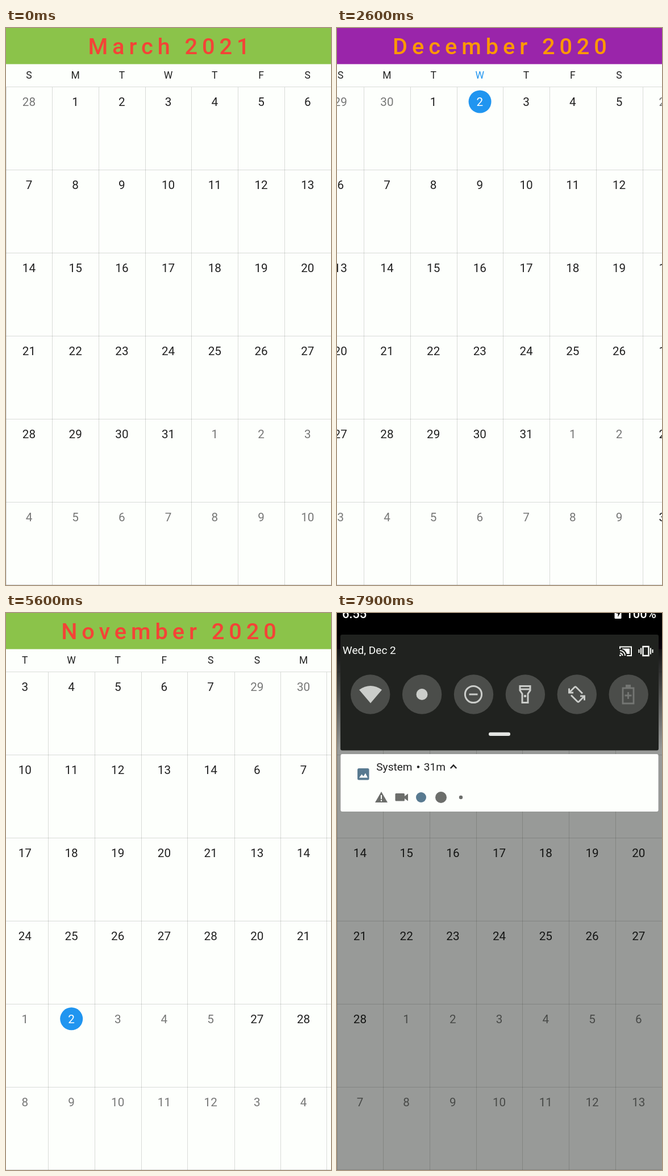
Write an HTML page with a canvas that moves like this. It is 572 px wide and 979 px high and loops after 8000 ms.

```html
<!DOCTYPE html>
<html lang="en">
<head>
<meta charset="utf-8">
<title>Month calendar</title>
<style>
html, body { margin: 0; width: 100%; height: 100%; overflow: hidden; background: #fdfffc; }
canvas { display: block; }
</style>
</head>
<body>
<canvas id="stage" width="572" height="979"></canvas>
<script>
const ctx = document.getElementById('stage').getContext('2d');
const W = 572, H = 979, LOOP = 8000, STEP = 100;
const COL = W / 7, TOP = 103.3, ROW = 145.95;
const PAPER = '#fdfffc', BLUE = '#2095f0', INK = '#212121', MUTED = '#767776';
const MONTHS = ['January', 'February', 'March', 'April', 'May', 'June', 'July',
  'August', 'September', 'October', 'November', 'December'];
const YEAR = 2020, TODAY = new Date(YEAR, 11, 2).getTime();
const FIRST_MONTH = 14; // months counted from January 2020
const SETTLE = 250;

const SWIPES = [
  { start: 560, release: 860, drag: 250, step: -1 },
  { start: 1500, release: 1770, drag: 250, step: -1 },
  { start: 2320, release: 2441, drag: 200, step: -1 },
  { start: 3060, release: 3350, drag: 250, step: -1 },
  { start: 3904, release: 4150, drag: 250, step: -1 },
  { start: 4840, release: 5050, drag: 250, step: 1 },
  { start: 5505, release: 5620, drag: 250, step: 1 },
  { start: 6130, release: 6301, drag: 250, step: 1 },
  { start: 6930, release: 7050, drag: 250, step: 1 }
];

// cubic-bezier(.25, .1, .25, 1)
function ease(x) {
  let lo = 0, hi = 1;
  for (let i = 0; i < 24; i++) {
    const s = (lo + hi) / 2;
    if (.75 * s * (1 - s) + s ** 3 < x) lo = s; else hi = s;
  }
  return .3 * lo * (1 - lo) ** 2 + 3 * lo * lo * (1 - lo) + lo ** 3;
}

function smooth(from, to, t) {
  const u = Math.min(1, Math.max(0, (t - from) / (to - from)));
  return u * u * (3 - 2 * u);
}

function text(str, x, y, size, color, align = 'center', weight = 400) {
  ctx.font = `${weight} ${size}px Roboto, sans-serif`;
  ctx.textAlign = align;
  ctx.fillStyle = color;
  ctx.fillText(str, x, y);
}

function rect(x, y, w, h, color) {
  ctx.fillStyle = color;
  ctx.fillRect(x, y, w, h);
}

function box(x, y, w, h, r, color) {
  ctx.beginPath();
  ctx.roundRect(x, y, w, h, r);
  ctx.fillStyle = color;
  ctx.fill();
}

function disc(x, y, r, color) {
  ctx.beginPath();
  ctx.arc(x, y, r, 0, Math.PI * 2);
  ctx.fillStyle = color;
  ctx.fill();
}

function shape(d, color, width) {
  const path = new Path2D(d);
  if (width) {
    ctx.strokeStyle = color;
    ctx.lineWidth = width;
    ctx.stroke(path);
  } else {
    ctx.fillStyle = color;
    ctx.fill(path);
  }
}

function drawHeader(month) {
  const date = new Date(YEAR, month, 1);
  const green = date.getMonth() % 2 === 0;
  const spacing = 7.94;
  const title = `${MONTHS[date.getMonth()]} ${date.getFullYear()}`;
  rect(0, 0, W, 63.5, green ? '#8bc34a' : '#9a25aa');
  ctx.letterSpacing = spacing + 'px';
  ctx.font = '500 39.7px Roboto, sans-serif';
  const left = (W - ctx.measureText(title).width + spacing) / 2 + .5;
  text(title, left, 45.6, 39.7, green ? '#f44336' : '#ff9800', 'left', 500);
  ctx.letterSpacing = '0px';
}

function drawMonth(month, shift) {
  const first = new Date(YEAR, month, 1);
  const hasToday = new Date(TODAY).getMonth() === first.getMonth()
    && first.getFullYear() === YEAR;
  for (let c = 0; c < 7; c++) {
    const x = shift + (c + .5) * COL - .4;
    const edge = shift + Math.max(.4, c * COL - .4);
    rect(Math.round(edge), 104, 1, H - 104, 'rgba(0,0,0,.14)');
    const isWeekday = hasToday && c === new Date(TODAY).getDay();
    text('SMTWTFS'[c], x, 89.2, 17.5, isWeekday ? BLUE : INK);
    for (let r = 0; r < 6; r++) {
      const day = new Date(YEAR, month, 1 - first.getDay() + r * 7 + c);
      const y = 129.5 + r * ROW;
      const isToday = day.getTime() === TODAY;
      if (isToday) disc(x + .2, y, 20, BLUE);
      const color = isToday ? '#fff' : day.getMonth() === first.getMonth() ? INK : MUTED;
      text(day.getDate(), x, y + 7.4, 20.66, color);
    }
  }
}

function drawCalendar(t) {
  let month = FIRST_MONTH, title = month, shift = 0, step = 0;
  for (const s of SWIPES) {
    if (t >= s.release + SETTLE) {
      month += s.step;
      title = month;
    } else if (t > s.start) {
      const released = t >= s.release;
      const travel = released
        ? s.drag + (W - s.drag) * ease((t - s.release) / SETTLE)
        : s.drag * ((t - s.start) / (s.release - s.start)) ** 2;
      step = s.step;
      shift = -step * travel;
      if (released) title = month + step;
      break;
    }
  }
  drawMonth(month, shift);
  if (step) drawMonth(month + step, shift + step * W);
  for (let r = 0; r <= 6; r++) {
    rect(0, Math.min(978, Math.round(TOP + r * ROW)), W, 1, 'rgba(0,0,0,.14)');
  }
  drawHeader(title);
}

function drawTiles() {
  const light = '#cbcdca', dim = '#747673', face = '#4b4d4a';
  for (let i = 0; i < 6; i++) disc(58.7 + i * 90.9, 143, 34.7, face);
  shape('M59 158.5 L39 135 Q59 121 79 135 Z', light);
  disc(149.5, 143, 10, light);
  shape('M254.6 143 A14.6 14.6 0 1 1 225.4 143 A14.6 14.6 0 1 1 254.6 143 M232.5 143 H247.5', light, 3);
  shape('M322 128.5 H340 V136 L336 142 V157.5 H326 V142 L322 136 Z M322 134 H340', light, 3);
  disc(331, 146, 2.3, light);
  shape('M408.5 132.5 V140 H416 M409 139.5 L418 130.5 Q419.5 129 421 130.5 L432 141.5', light, 2.9);
  shape('M435.5 153.5 V146 H428 M435 146.5 L426 155.5 Q424.5 157 423 155.5 L412 144.5', light, 2.9);
  shape('M503 132 H522 V159 H503 Z M506.5 145 H518.5 M512.5 139 V151', dim, 2.8);
  rect(508, 126, 9, 5, dim);
}

function drawStatus() {
  const white = '#fdfffc';
  text('6:55', 9, 9, 22, white, 'left', 500);
  text('100%', 562, 9, 22, white, 'right', 500);
  box(488.5, -10, 12, 20, 1.5, white);
  shape('M496 -7 L491.5 1 H494.5 V7 L499 -1 H496 Z', '#000');
  text('Wed, Dec 2', 9.8, 71.7, 19.07, white, 'left');
  shape('M498 63 V59.5 H518 V75 H510 M498 66 A9 9 0 0 1 507 75 M498 70.5 A5 5 0 0 1 502.5 75', white, 2);
  shape('M502 62.5 H515 V72 H510 Q508 65 502 63.5 Z', white);
  disc(498.5, 74.5, 1.6, white);
  shape('M538.5 59 H548.5 V75 H538.5 Z', white, 2.4);
  shape('M535 61.5 V72.5 M531.5 64 V70 M552 61.5 V72.5 M555.5 64 V70', white, 2);
}

function drawNotice() {
  const slate = '#587a90', grey = '#6c6e6b';
  box(6.4, 248, 559.2, 101, 3, PAPER);
  box(36, 273, 20.5, 20.5, 2.5, slate);
  shape('M39 289.5 L43.5 283.5 L46.5 287 L50 281.5 L54 289.5 Z', PAPER);
  text('System', 69.3, 276.7, 19.07, INK, 'left');
  disc(143, 270.5, 2.2, INK);
  text('31m', 191, 276.7, 19.07, INK, 'right');
  shape('M199.8 273 L205 267.5 L210.2 273', INK, 2.4);
  shape('M78 314 L89 333 H67 Z', grey);
  shape('M78 320 V327 M78 328.5 V331', PAPER, 2);
  box(102.5, 317, 16.5, 13.5, 1.5, grey);
  shape('M119 322 L125 317.5 V330.5 L119 326 Z', grey);
  disc(148, 324, 9, slate);
  disc(183, 324, 10, grey);
  disc(218, 324, 3.2, grey);
}

function drawShade(p) {
  rect(0, 0, W, H, `rgba(0,3,0,${.4 * p})`);
  ctx.save();
  ctx.translate(0, (p - 1) * 350);
  const fade = ctx.createLinearGradient(0, 38, 0, 240);
  fade.addColorStop(0, '#000');
  fade.addColorStop(1, 'rgba(0,0,0,0)');
  rect(0, -400, W, 438, '#000');
  rect(0, 38, W, 202, fade);
  box(6, 38, 560, 203.5, 3, '#20221f');
  drawStatus();
  drawTiles();
  box(267, 209.7, 38, 6.3, 3, '#e4e6e3');
  drawNotice();
  ctx.restore();
}

function frame() {
  const t = Math.floor(performance.now() % LOOP / STEP) * STEP;
  rect(0, 0, W, H, PAPER);
  drawCalendar(t);
  const pull = smooth(7540, 7860, t);
  if (pull > 0) drawShade(pull);
  requestAnimationFrame(frame);
}
frame();
</script>
</body>
</html>
```
